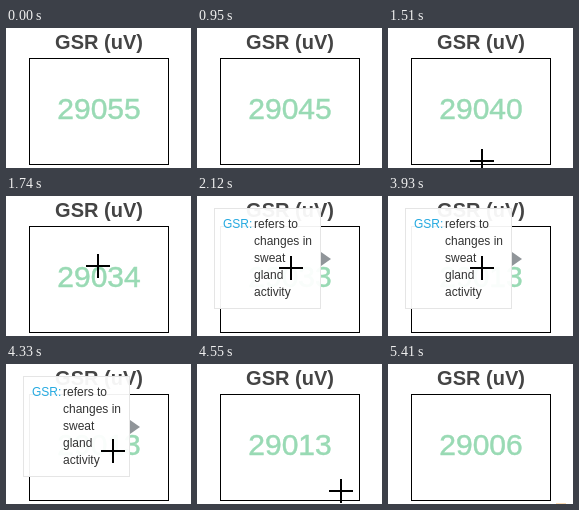
An HTML page for the animation above (5480 ms loop, 185x140 px).

```html
<!DOCTYPE html>
<html lang="en">
<head>
<meta charset="utf-8">
<style>
html, body { margin: 0; height: 100%; overflow: hidden; background: #fff; }
svg { display: block; width: 185px; height: 140px; font-family: "Liberation Sans", Arial, sans-serif; }
.center { text-anchor: middle; }
#title { font-size: 20px; font-weight: bold; fill: #444; }
#value { font-size: 30px; fill: #99dab4; stroke: #99dab4; stroke-width: .5px; }
#tip { font-size: 12px; fill: #333; }
</style>
</head>
<body>
<svg viewBox="0 0 185 140">
  <text id="title" class="center" x="93" y="20.5">GSR (uV)</text>
  <rect x="23.5" y="30.5" width="139" height="106" fill="none" stroke="#000"/>
  <text id="value" class="center" x="93" y="91"></text>
  <g id="tip">
    <rect x="17.5" y="12.5" width="106" height="100" fill="#fff" fill-opacity=".94" stroke="#e5e5e5"/>
    <path d="M124 56l10 7l-10 7z" fill="#909599"/>
    <text x="26" y="32" fill="#26aae1">GSR:</text>
    <text>
      <tspan x="57" y="32">refers to</tspan>
      <tspan x="57" y="49">changes in</tspan>
      <tspan x="57" y="66">sweat</tspan>
      <tspan x="57" y="83">gland</tspan>
      <tspan x="57" y="100">activity</tspan>
    </text>
  </g>
  <path id="cross" d="M-12-1h24v2h-24zM-1-12h2v24h-2z"/>
  <rect id="edge" x="168" y="139" width="10" height="1" fill="#fbdcb4"/>
</svg>
<script>
const LOOP = 5480;

// Key points: [ms, value...], joined by straight lines
const reading = [
  [230, 55], [630, 46], [950, 45], [1270, 45], [1740, 34], [2050, 34],
  [2740, 21], [3160, 21], [3930, 13], [4550, 13], [4780, 6]
];
const pointer = [
  [1430, 95, 155], [1740, 92, 70], [1819, 92, 70], [1820, 92, 61], [2050, 92, 61],
  [2120, 94, 72], [4250, 94, 72], [4550, 144, 127], [4629, 144, 127], [4860, 166, 155]
];

function follow(keys, t) {
  const i = keys.findLastIndex(k => k[0] <= t);
  const a = keys[Math.max(i, 0)], b = keys[Math.min(i + 1, keys.length - 1)];
  const p = a === b ? 0 : (t - a[0]) / (b[0] - a[0]);
  return a.slice(1).map((v, n) => v + (b[n + 1] - v) * p);
}

const $ = id => document.getElementById(id);
const within = (t, from, to) => t >= from && t < to;
const show = (id, on) => $(id).setAttribute("visibility", on ? "visible" : "hidden");

function draw(now) {
  const t = now % LOOP;
  const [x, y] = follow(pointer, t).map(Math.round);
  $("value").textContent = 29000 + Math.ceil(follow(reading, t)[0]);
  $("cross").setAttribute("transform", `translate(${x} ${y})`);
  show("tip", within(t, 1590, 1740) || within(t, 2050, 4400));
  show("edge", t >= 5410);
}

let start;
function tick(now) {
  start ??= now;
  draw(now - start);
  requestAnimationFrame(tick);
}
draw(0);
requestAnimationFrame(tick);
</script>
</body>
</html>
```
